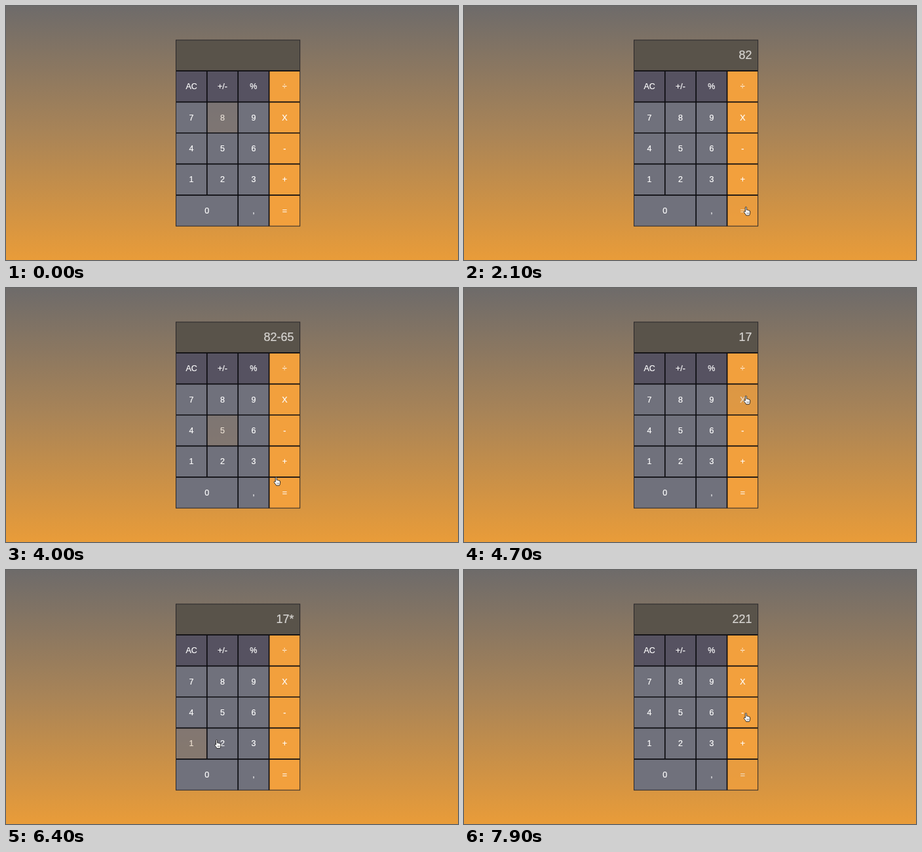
An HTML page for the animation above (8 s loop, 690 by 388 pixels).

```html
<!DOCTYPE html>
<html lang="en">
<head>
<meta charset="utf-8">
<title>Calculator</title>
<style>
  html, body { margin: 0; width: 100%; height: 100%; overflow: hidden; }
  body { background: linear-gradient(#6e6b6a, #a98457 50%, #e99c39); }
  svg { display: block; width: 690px; height: 388px; }
  text { font-family: "Liberation Sans", Arial, sans-serif; fill: #fff; stroke: #fff; stroke-width: .2; }
  .key text { font-size: 12.5px; text-anchor: middle; }
  .num rect { fill: #70717c; }
  .fn rect { fill: #565261; }
  .op rect { fill: #f2a03d; }
  .hover { opacity: .75; }
  #out { font-size: 18px; text-anchor: end; fill: #d8d6d3; stroke: #d8d6d3; }
  #lines { fill: none; stroke: #0c0c10; stroke-width: 1.7; }
  #frame { fill: none; stroke: #29272a; stroke-width: 1; }
</style>
</head>
<body>
<svg viewBox="0 0 690 388">
  <rect x="259.4" y="52" width="189.6" height="47.4" fill="#59534a"/>
  <text id="out" x="439.5" y="81.4"></text>
  <g id="keys"></g>
  <path id="lines"/>
  <rect id="frame" x="259.5" y="52" width="189.2" height="284.2"/>
  <g id="hand">
    <path d="M-2.9-5.4Q-2.9-6.6-1.9-6.6T-.9-5.4V-1.9Q.3-2.5 1-1.5 2.1-2 2.8-.9 4.4-1.1 4.4.6V3Q4.2 4.8 3.2 6.4H-1.6Q-2.2 4.8-4.4 2.2-5.4.8-4.5.2-3.7-.2-2.9.9Z"
      fill="#fff" stroke="#1b1b1b" stroke-width=".9" stroke-linejoin="round"/>
    <path d="M-.4 2V4.6M1.1 2V4.6M2.6 2V4.6" stroke="#333" stroke-width=".5"/>
  </g>
</svg>
<script>
const NS = "http://www.w3.org/2000/svg";
const X0 = 259.4, Y0 = 99.2, SIZE = 47.4;
const LOOP = 8000, STEP = 100, LAG = 150, TRAVEL = 250;
const $ = id => document.getElementById(id);

const rows = [
  ["AC", "+/-", "%", "÷"],
  ["7", "8", "9", "X"],
  ["4", "5", "6", "-"],
  ["1", "2", "3", "+"],
  ["0", "", ",", "="]
];

// keys in the order pressed, and when
const typed = "80+2==-65=X13=-";
const times = [150, 530, 950, 1350, 1650, 2110, 2500, 3150, 3820, 4300, 5575, 6300, 7000, 7690, LOOP + LAG];

function add(parent, tag, attrs) {
  const el = document.createElementNS(NS, tag);
  for (const k in attrs) el.setAttribute(k, attrs[k]);
  return parent.appendChild(el);
}

const keys = {};
rows.forEach((row, r) => row.forEach((label, c) => {
  if (!label) return;
  const x = X0 + c * SIZE, y = Y0 + r * SIZE;
  const w = label === "0" ? 2 * SIZE : SIZE;
  const kind = c === 3 ? "op" : r === 0 ? "fn" : "num";
  const el = add($("keys"), "g", { class: "key " + kind });
  add(el, "rect", { x, y, width: w, height: SIZE });
  add(el, "text", { x: x + w / 2, y: y + SIZE / 2 + 4.2 }).textContent = label;
  keys[label] = { el, x, y, w };
}));

let lines = "";
for (let r = 0; r < 5; r++) lines += `M${X0} ${Y0 + r * SIZE}h${4 * SIZE}`;
for (let c = 1; c < 4; c++) lines += `M${X0 + c * SIZE} ${Y0}v${(c === 1 ? 4 : 5) * SIZE}`;
$("lines").setAttribute("d", lines);

// resting place of the hand on a key
function rest(label) {
  const k = keys[label];
  return [k.x + k.w / 2 + 6, k.y + SIZE / 2 + 1];
}

// after each press the hand glides to the next key and waits there
function pointer(t) {
  const next = times.findIndex(p => p > t);
  const [x1, y1] = rest(typed[next]);
  if (!next) return [x1, y1];
  const [x0, y0] = rest(typed[next - 1]);
  const k = Math.min(1, (t - times[next - 1]) / TRAVEL), e = k * k * (3 - 2 * k);
  return [x0 + (x1 - x0) * e, y0 + (y1 - y0) * e];
}

function solve(sum) {
  const [, a, op, b] = sum.match(/^(\d+)([-+*])(\d+)$/) || [];
  if (!op) return sum;
  return String(op === "+" ? +a + +b : op === "-" ? a - b : a * b);
}

function display(t) {
  let out = "";
  times.forEach((p, i) => {
    if (p > t) return;
    const key = typed[i];
    out = key === "=" ? solve(out) : out + (key === "X" ? "*" : key);
  });
  return out;
}

function draw(now) {
  const t = Math.floor((now % LOOP) / STEP) * STEP;
  const [x, y] = pointer(t);
  $("hand").setAttribute("transform", `translate(${x + 1} ${y})`);
  $("hand").setAttribute("visibility", t < 300 ? "hidden" : "visible");

  // hover and display trail the pointer
  const [lx, ly] = pointer(t - LAG), hx = lx - 2, hy = ly - 6;
  for (const k of Object.values(keys)) {
    k.el.classList.toggle("hover",
      hx >= k.x && hx < k.x + k.w && hy >= k.y && hy < k.y + SIZE);
  }
  $("out").textContent = display(t - LAG);
}

const start = performance.now();
function tick() {
  draw(performance.now() - start);
  requestAnimationFrame(tick);
}
tick();
</script>
</body>
</html>
```
